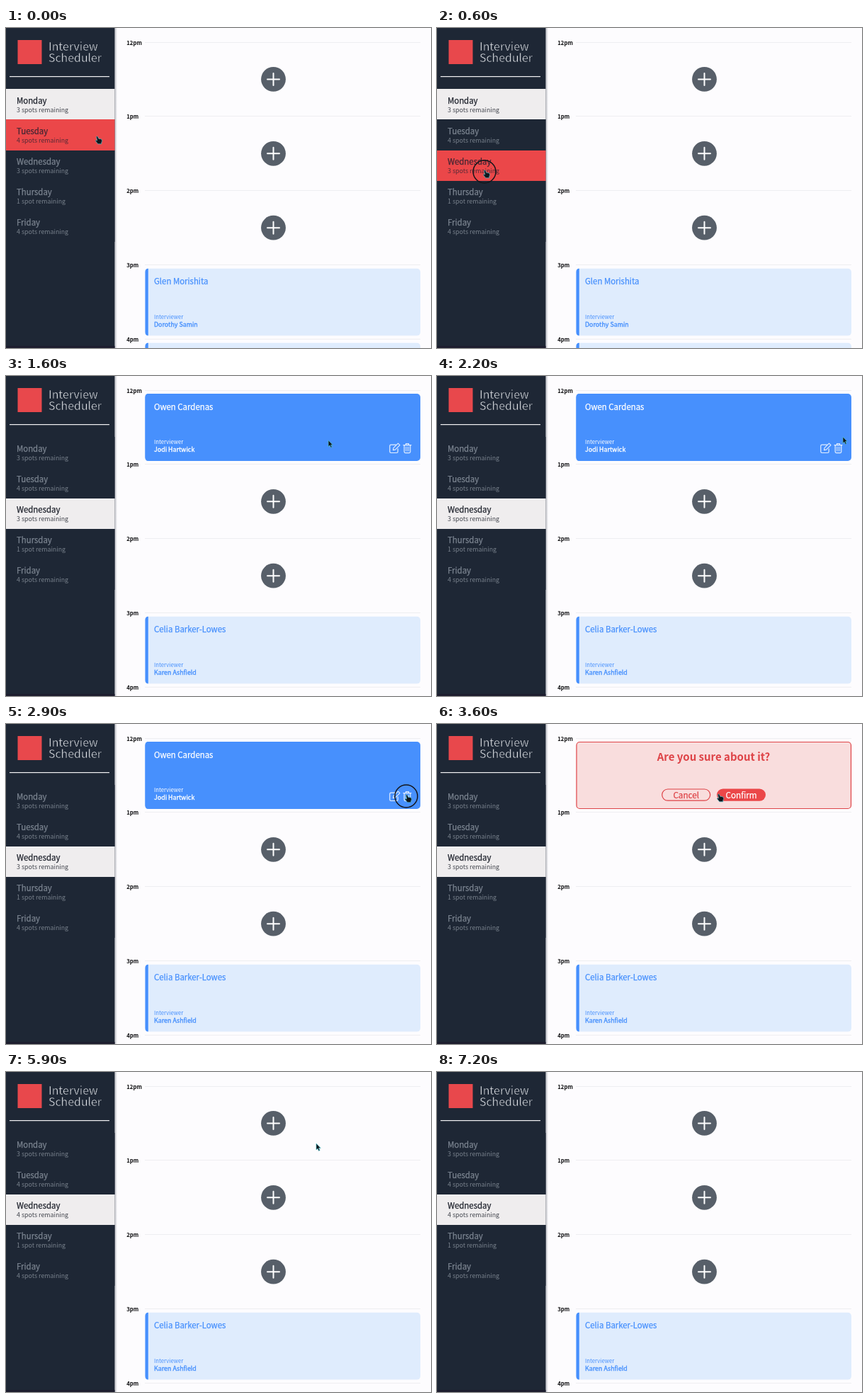
An HTML page for the animation above (7.3 s loop, 600 px wide and 452 px high).

```html
<!DOCTYPE html>
<html lang="en">
<head>
<meta charset="utf-8">
<title>Interview Scheduler</title>
<style>
  html, body { margin: 0; width: 100%; height: 100%; overflow: hidden; background: #fdfcfe; }
  svg { display: block; width: 600px; height: 452px; }
  text {
    font-family: "Noto Sans CJK JP", "Noto Sans CJK SC", "Noto Sans CJK", "Open Sans", sans-serif;
    white-space: pre;
  }
</style>
</head>
<body>
<svg id="stage" viewBox="0 0 600 452"></svg>
<script>
const LOOP = 7300, STEP = 100;
const DAY_CLICK = 800, DELETE_CLICK = 3000, CONFIRM_CLICK = 5000, DELETED = 5500;
const NAVY = '#1e2735', RED = '#eb4749', DEEP_RED = '#de4347', BLUE = '#4790fd', PALE = '#dfecfd';
const ROW = 104.9, DAY_TOP = 86.3, DAY_H = 43.1;

// Pointer path: time, x, y
const PATH = [
  [0, 129, 153], [500, 68, 201], [1200, 68, 201], [1700, 500, 78], [2200, 573, 86],
  [2600, 566, 100], [3100, 566, 100], [3600, 398, 99], [4400, 439, 99],
  [5000, 439, 99], [5400, 438, 101], [6100, 438, 101], [6500, 443, -22]
];
const CLICKS = [[500, 800], [2700, 3000], [4600, 5000]];

const DAYS = [['Monday', 3], ['Tuesday', 4], ['Wednesday', 3], ['Thursday', 1], ['Friday', 4]];

const within = (x, y, x0, y0, x1, y1) => x >= x0 && x <= x1 && y >= y0 && y <= y1;

const rect = (x, y, w, h, fill, more = '') =>
  `<rect x="${x}" y="${y}" width="${w}" height="${h}" fill="${fill}" ${more}/>`;

const line = (d, color, width) =>
  `<path d="${d}" fill="none" stroke="${color}" stroke-width="${width}" stroke-linecap="round" stroke-linejoin="round"/>`;

const text = (x, y, size, weight, fill, words, more = '') =>
  `<text x="${x}" y="${y}" font-size="${size}" font-weight="${weight}" fill="${fill}" ${more}>${words}</text>`;

// Regular weight with a fine outline, for the weights between regular and bold
const medium = (x, y, size, fill, words, outline = .25, more = '') =>
  text(x, y, size, 400, fill, words, `stroke="${fill}" stroke-width="${outline}" ${more}`);

const CENTER = 'text-anchor="middle"';

function pointerAt(t) {
  const next = PATH.findIndex(p => p[0] > t);
  if (next < 0) return PATH[PATH.length - 1].slice(1);
  const [t0, x0, y0] = PATH[next - 1], [t1, x1, y1] = PATH[next];
  const u = (t - t0) / (t1 - t0), k = u * u * (3 - 2 * u);
  return [x0 + (x1 - x0) * k, y0 + (y1 - y0) * k];
}

function sidebar(t, x, y) {
  const selected = t < DAY_CLICK ? 0 : 2;
  const days = DAYS.map(([name, spots], i) => {
    const top = DAY_TOP + i * DAY_H, edge = Math.round(top);
    const hover = within(x, y, 0, top, 154, top + DAY_H);
    const count = i === 2 && t >= DELETED ? 4 : spots;
    const [bg, ink, sub] = i === selected ? ['#efedee', '#20242e', '#43464e']
      : hover ? [RED, '#452633', '#562a36']
      : [NAVY, '#7b8490', '#78818c'];
    return rect(0, edge, 153.5, Math.round(top + DAY_H) - edge, bg) +
      medium(15, top + 20.3, 11.4, ink, name) +
      text(15, top + 32.6, 8.85, 300, sub, `${count} spot${count > 1 ? 's' : ''} remaining`);
  });
  const thin = `stroke="${NAVY}" stroke-width=".4"`;
  return rect(153.5, 0, 3.5, 452, 'url(#shade)') +
    rect(0, 0, 153.5, 452, NAVY) +
    rect(0, 449, 153.5, 3, '#1d1d2e') +
    rect(16.5, 17, 34, 34, '#e8484c') +
    text(60, 32, 15.9, 300, '#e6e9ed', 'Interview', thin) +
    text(60, 47.6, 15.9, 300, '#e6e9ed', 'Scheduler', thin) +
    rect(5, 68, 141, 1.2, '#f2f2f4') +
    days.join('');
}

function addButton(row) {
  const y = 72.4 + row * ROW;
  return `<circle cx="377.5" cy="${y}" r="17.4" fill="#575f69"/>` +
    line(`M369 ${y}h17M377.5 ${y - 8.5}v17`, '#fff', 2);
}

function card(row, name, interviewer, hover) {
  const y = 25.1 + row * ROW, ink = hover ? '#fff' : BLUE;
  return `<g transform="translate(196.5 ${y})">` +
    rect(0, 0, 388.5, 94.8, hover ? BLUE : PALE, 'rx="5"') +
    `<path d="M4.3 0V94.8Q0 94.8 0 89.8V5Q0 0 4.3 0z" fill="${BLUE}"/>` +
    medium(12.5, 22.6, 11.4, ink, name) +
    text(12.5, 70.9, 7.75, 300, ink, 'Interviewer') +
    medium(12.5, 82.2, 8.9, ink, interviewer, .35) +
    (hover ? icons() : '') + '</g>';
}

function icons() {
  const ink = '#e4efff';
  return line('M354 72h-7q-1.7 0-1.7 1.7v8q0 1.7 1.7 1.7h8q1.7 0 1.7-1.7v-4', ink, 1.2) +
    line('M350.5 76.5l6.5-6.5 2.5 2.5-6.5 6.5-3 .5z', ink, 1.1) +
    line('M364.5 72.5h11M368 72.5v-2h4v2M365.7 72.5v9.5q0 1.5 1.5 1.5h5.6q1.5 0 1.5-1.5v-9.5', ink, 1.2) +
    line('M368 75v6M370 75v6M372 75v6', ink, .8);
}

function confirmCard() {
  return rect(197, 25.5, 387.5, 94, '#f9dddd', `rx="4.5" stroke="${DEEP_RED}" stroke-width="1.2"`) +
    text(390.5, 52.3, 15, 600, DEEP_RED, 'Are you sure about it?', CENTER) +
    rect(317.7, 92, 68, 16.2, 'none', `rx="8.1" stroke="${DEEP_RED}" stroke-width="1.2"`) +
    medium(351.7, 104.6, 11.7, DEEP_RED, 'Cancel', .25, CENTER) +
    rect(395, 91.4, 69, 17.4, RED, 'rx="8.7"') +
    medium(429.5, 104.6, 11.7, '#fff', 'Confirm', .25, CENTER);
}

function schedule(t, x, y) {
  const hours = [12, 1, 2, 3, 4].map((hour, i) =>
    rect(196, Math.floor(20 + i * ROW), 389, 1, '#eeeef1') +
    text(170.3, 23.5 + i * ROW, 7.75, 700, '#0c0c0e', hour + 'pm'));
  let slots = addButton(1) + addButton(2);
  if (t < DAY_CLICK) {
    slots += addButton(0) + card(3, 'Glen Morishita', 'Dorothy Samin') + card(4, '', '');
  } else {
    slots += card(3, 'Celia Barker-Lowes', 'Karen Ashfield');
    if (t < DELETE_CLICK) {
      slots += card(0, 'Owen Cardenas', 'Jodi Hartwick', within(x, y, 197, 25, 585, 120));
    } else if (t < CONFIRM_CLICK) {
      slots += confirmCard();
    } else if (t >= DELETED) {
      slots += addButton(0);
    }
  }
  return hours.join('') + slots;
}

function pointer(t, x, y) {
  const onTrash = t >= DAY_CLICK && t < DELETE_CLICK && within(x, y, 559, 94, 575, 111);
  const onButton = t >= DELETE_CLICK && t < CONFIRM_CLICK &&
    (within(x, y, 317, 91, 386, 109) || within(x, y, 395, 91, 464, 109));
  const shape = x < 154 || onTrash || onButton
    ? 'M-1.5 .8Q-.8-.6 .5 .5L2 3.6Q4.5 3 6.2 4.6Q7.3 6.5 5.8 8.8L5.7 10.8H.8L-2.6 6.6Q-2.5 4.8-.3 6z'
    : 'M0 0V9L2 7.2L3.6 10.4L5.1 9.6L3.6 6.5H6.2z';
  const ring = CLICKS.some(([from, to]) => t >= from && t < to)
    ? `<circle cx="${x - 1}" cy="${y + 2}" r="16" fill="none" stroke="#15151a" stroke-width="1.5"/>` : '';
  return ring + `<path transform="translate(${x} ${y})" d="${shape}" fill="#10151b" stroke="#55c3cf" stroke-width=".7"/>`;
}

const stage = document.getElementById('stage');
const defs = '<defs><linearGradient id="shade"><stop stop-color="#bcbdc4"/>' +
  '<stop offset="1" stop-color="#fdfcfe"/></linearGradient></defs>';
let shown = -1;

function draw(now) {
  const t = Math.floor((now % LOOP) / STEP) * STEP;
  if (t !== shown) {
    shown = t;
    const [x, y] = pointerAt(t);
    stage.innerHTML = defs + rect(0, 0, 600, 452, '#fdfcfe') +
      schedule(t, x, y) + sidebar(t, x, y) + pointer(t, x, y);
  }
}

const start = performance.now();
function tick() {
  draw(performance.now() - start);
  requestAnimationFrame(tick);
}
tick();
</script>
</body>
</html>
```
